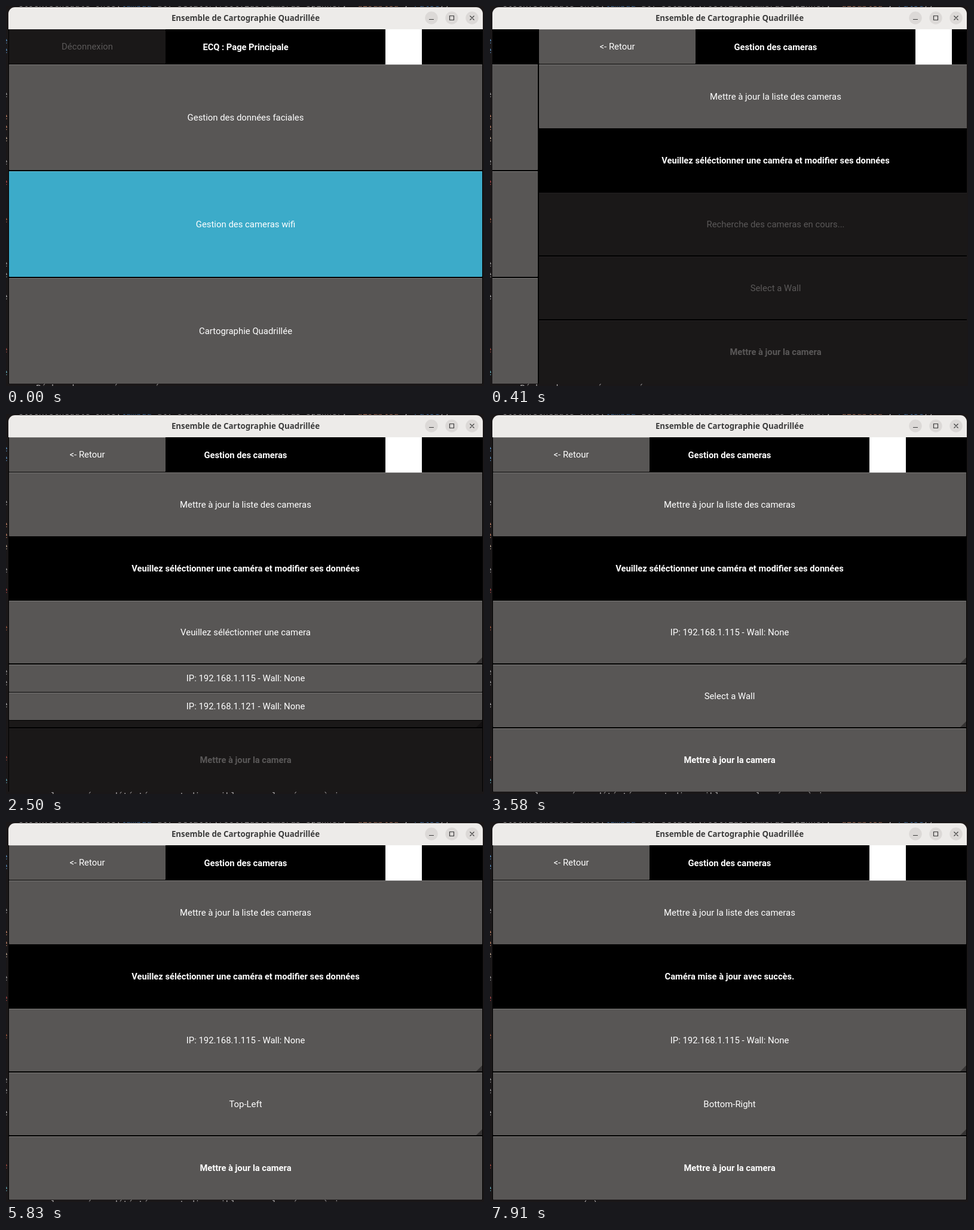
An HTML page that plays this animation: 800 px wide and 637 px high, repeating every 8 s.

```html
<!DOCTYPE html>
<html lang="fr">
<head>
<meta charset="utf-8">
<style>
html, body { margin: 0; width: 100%; height: 100%; overflow: hidden; background: #1a1718; }
div, pre { position: absolute; margin: 0; box-sizing: border-box; white-space: nowrap; }
#stage { width: 800px; height: 637px; overflow: hidden; background: #1a1718; }
pre, .bit { font: 14.3px/16px "DejaVu Sans Mono", monospace; color: #a9a7a8; }
pre b { font-weight: normal; color: #4f86c0; }
pre i { font-style: normal; color: #c08468; }
#bar { left: 4px; top: 2px; width: 794px; height: 37px; border-radius: 11px 11px 0 0; background: #edebe9;
  font: bold 13.3px/36px "Noto Sans", sans-serif; color: #3d3d3d; text-align: center; }
#bar svg { position: absolute; left: 0; top: 0; }
#body { left: 4px; top: 39px; width: 794px; height: 594px; overflow: hidden; background: #000; }
.screen { width: 794px; height: 594px; background: #000; }
.row { left: 1px; width: 792px; text-align: center; font: 14.9px Roboto, sans-serif; color: #fff; overflow: hidden; }
.bold { font-weight: bold; font-size: 14.7px; }
.btn { background: #585655; box-shadow: inset 0 1px #7d7b7a, 0 1px #000; border-radius: 1px; }
.down { background: #3cabc9; box-shadow: inset 0 1px #62bdd5; }
.off { background: #1a1818; box-shadow: inset 0 1px #222021; color: #5a5858; }
.spin::after { content: ""; position: absolute; right: 0; bottom: 0;
  border: 5px solid; border-color: transparent #353333 #353333 transparent; }
.off.spin::after { border-color: transparent #121011 #121011 transparent; }
.logo { left: 631px; top: 0; width: 61px; height: 60px; background: #fff; }
</style>
</head>
<body>
<div id="stage">
  <pre style="left:20px;top:-12px">Clock.schedule_once(<b>lambda</b> dt: setattr(root.ids.cameras_spinner, <i>'disabled'</i>, <b>False</b>))</pre>
  <pre id="log" style="top:632px"></pre>
  <div id="bits"></div>
  <div id="bar">Ensemble de Cartographie Quadrillée
    <svg width="794" height="37" fill="none" stroke="#3d3d3d" stroke-width="1.2">
      <g fill="#dcd9d7" stroke="none"><circle cx="708" cy="18" r="10.7"/><circle cx="742" cy="18" r="10.7"/><circle cx="776" cy="18" r="10.7"/></g>
      <path d="M704 20.5h8M738.5 14.5h7v7h-7zM772.5 14.5l7 7m0-7l-7 7"/>
    </svg>
  </div>
  <div id="body"><div class="screen" id="home"></div><div class="screen" id="cams"></div></div>
</div>
<script>
const $ = id => document.getElementById(id);
const row = (y, h, text, cls = 'btn', style = '') =>
  `<div class="row ${cls}" style="top:${y}px;height:${h}px;line-height:${h + 1}px;${style}">${text}</div>`;
const header = (back, title, cls) =>
  row(0, 59, title, 'bold') + row(0, 58, back, cls, 'width:262px') + '<div class="logo"></div>';
const list = (y, items) => items.map((s, i) => row(Math.floor(y + i * 47.7), 46, s)).join('');

const camera = 'IP: 192.168.1.115 - Wall: None';
const corners = ['Top-Left', 'Top-Right', 'Bottom-Left', 'Bottom-Right'];
const prompt = 'Veuillez séléctionner une caméra et modifier ses données';
const success = 'Caméra mise à jour avec succès.';

// Each step changes part of the page state from its time on.
const steps = [
  [0, { msg: prompt, cam: 'Recherche des cameras en cours...', wall: 'Select a Wall', found: 0, chosen: 0, menu: '', log: 0 }],
  [1000, { cam: 'Veuillez séléctionner une camera', found: 1, log: 1 }],
  [2410, { menu: 'cams' }],
  [3160, { menu: '', cam: camera, chosen: 1 }],
  [5160, { menu: 'walls' }],
  [5830, { menu: '', wall: corners[0] }],
  [6410, { msg: success, wall: 'Select a Wall', log: 2 }],
  [6750, { menu: 'walls' }],
  [7410, { menu: '', wall: corners[3] }]
];
const logs = [
  [33, '- Récherche_-_caméras_-_réseau_-_'],
  [75, 'les caméras détéctées sont disponibles sur le réseau à jour'],
  [155, '(,)']
];

function cams(s) {
  const on = (ok, cls) => cls + (ok ? ' btn' : ' off');
  return header('&lt;- Retour', 'Gestion des cameras', 'btn')
    + row(59, 107, 'Mettre à jour la liste des cameras')
    + row(166, 107, s.msg, 'bold')
    + row(274, 105, s.cam, on(s.found, 'spin'))
    + row(381, 105, s.wall, on(s.chosen, 'spin'))
    + row(488, 106, 'Mettre à jour la camera', on(s.chosen, 'bold'))
    + (s.menu === 'cams' ? list(381, [camera, camera.replace('115', '121')]) : '')
    + (s.menu === 'walls' ? list(190, corners) : '');
}

const home = down => header('Déconnexion', 'ECQ : Page Principale', 'off')
  + row(59, 177, 'Gestion des données faciales')
  + row(238, 177, 'Gestion des cameras wifi', down ? 'btn down' : 'btn')
  + row(417, 177, 'Cartographie Quadrillée');

// Edges of the editor showing behind the window.
const bits = [[58, '#5a8fc0'], [74, '#5a8fc0'], [148, '#999'], [185, '#c08468'], [203, '#c08468'], [222, '#b9a48f'],
  [261, '#999'], [295, '#b04a4a'], [358, '#a05a40'], [432, '#999'], [450, '#999'], [487, '#aaa'], [576, '#a04a40'], [614, '#62a8b5']];
$('bits').innerHTML = bits.map(([y, c]) => `<div class="bit" style="left:-6px;top:${y - 8}px;color:${c}">e</div>`).join('')
  + [54, 628].map(y => `<div class="bit" style="left:798px;top:${y - 8}px">[</div>`).join('');

let shown = '';
function draw() {
  const t = performance.now() % 8000;
  const tick = Math.floor((t + 7) * 0.012) / 0.012;
  const p = Math.min(1, Math.max(0, (tick - 141) / 400));
  const x = Math.round(794 * (1 - p) ** 2);
  $('cams').style.transform = `translateX(${x}px)`;
  $('home').style.transform = `translateX(${x - 794}px)`;

  const past = steps.filter(([at]) => at <= t);
  const down = t < 80;
  const key = past.length + ':' + down;
  if (key !== shown) {
    shown = key;
    const s = Object.assign({}, ...past.map(([, change]) => change));
    $('home').innerHTML = home(down);
    $('cams').innerHTML = cams(s);
    const [left, text] = logs[s.log];
    $('log').style.left = left + 'px';
    $('log').textContent = text;
  }
  requestAnimationFrame(draw);
}
draw();
</script>
</body>
</html>
```
